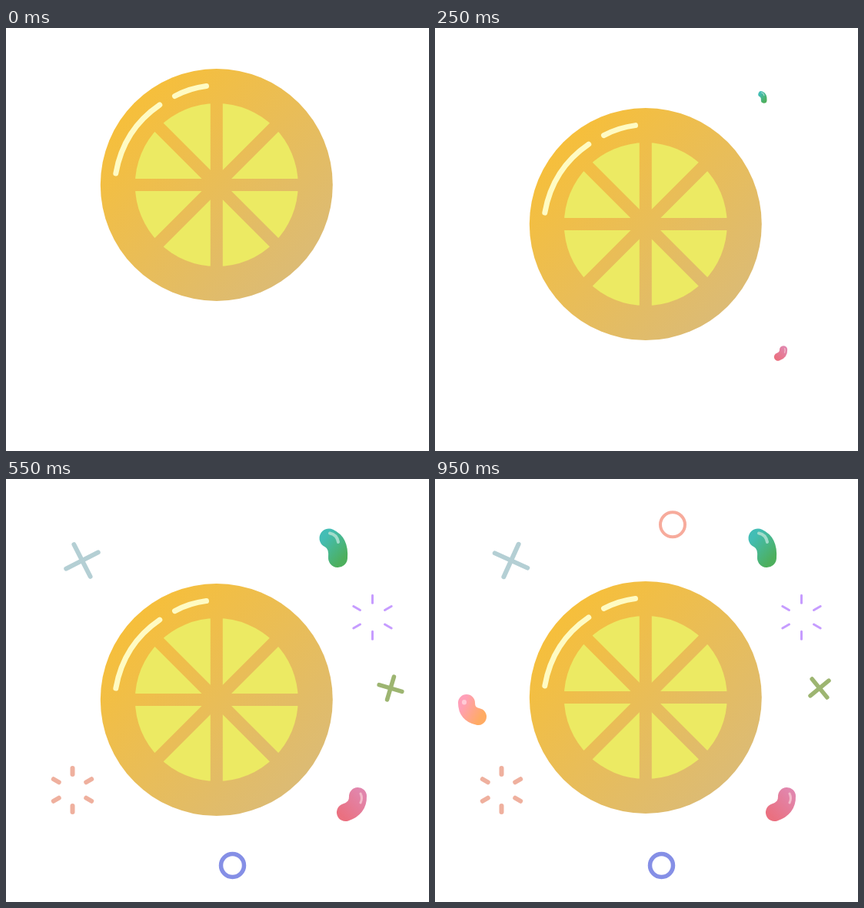
Recreate the animation shown at these times as an HTML page with a canvas. Size 550 by 550 pixels, loop 1000 ms.

```html
<!DOCTYPE html>
<html lang="en">
<head>
<meta charset="utf-8">
<title>Lemon drop</title>
<style>
  html, body { margin: 0; height: 100%; overflow: hidden; background: #fff; }
  canvas { display: block; }
</style>
</head>
<body>
<canvas id="stage" width="550" height="550"></canvas>
<script>
const ctx = document.getElementById('stage').getContext('2d');
const LOOP = 1000, STEP = 50;

// Piecewise linear value at time t from [time, value] pairs.
function track(t, keys) {
  if (t <= keys[0][0]) return keys[0][1];
  for (let i = 1; i < keys.length; i++) {
    const [t0, a] = keys[i - 1], [t1, b] = keys[i];
    if (t <= t1) return a + (b - a) * (t - t0) / (t1 - t0);
  }
  return keys[keys.length - 1][1];
}

// Quick growth that settles, for the crosses and rings.
const pop = (t, start) =>
  track(t, [[start, 0], [start + 50, .6], [start + 100, .87], [start + 150, 1]]);

function at(x, y, scale, angle, draw) {
  if (scale <= 0) return;
  ctx.save();
  ctx.translate(x, y);
  ctx.scale(scale, scale);
  ctx.rotate(angle * Math.PI / 180);
  ctx.lineCap = 'round';
  draw();
  ctx.restore();
}

function stroke(color, width) {
  ctx.strokeStyle = color;
  ctx.lineWidth = width;
  ctx.stroke();
}

function line(x0, y0, x1, y1, color, width) {
  ctx.beginPath();
  ctx.moveTo(x0, y0);
  ctx.lineTo(x1, y1);
  stroke(color, width);
}

function curve([x0, y0, cx, cy, x1, y1], color, width) {
  ctx.beginPath();
  ctx.moveTo(x0, y0);
  ctx.quadraticCurveTo(cx, cy, x1, y1);
  stroke(color, width);
}

function disc(r, color) {
  ctx.beginPath();
  ctx.arc(0, 0, r, 0, Math.PI * 2);
  ctx.fillStyle = color;
  ctx.fill();
}

function gradient(x0, y0, x1, y1, from, to) {
  const g = ctx.createLinearGradient(x0, y0, x1, y1);
  g.addColorStop(0, from);
  g.addColorStop(1, to);
  return g;
}

function lemon(y) {
  at(273.8, y, 1, 0, () => {
    const skin = gradient(-107, -107, 107, 107, '#f6bf3b', '#dcbb74');
    disc(151, skin);
    disc(106, '#ecea63');
    for (let i = 0; i < 4; i++) {
      const a = i * Math.PI / 4, x = 108 * Math.cos(a), y = 108 * Math.sin(a);
      line(-x, -y, x, y, skin, 16);
    }
    curve([-131, -15, -121, -72, -74, -104], '#fffbc3', 7);
    curve([-54.3, -115.5, -35, -125.8, -13.3, -128.5], '#fffbc3', 7);
  });
}

function bean(x, y, scale, body, width, colors, shine, shineColor, shineWidth) {
  at(x, y, scale, 0, () => {
    curve(body, gradient(...colors), width);
    curve(shine, shineColor, shineWidth);
  });
}

function burst(x, y, inner, outer, color, width) {
  for (let i = 0; i < 6; i++)
    at(x, y, 1, 30 + i * 60, () => line(inner, 0, outer, 0, color, width));
}

function cross(x, y, scale, angle, half, color, width) {
  at(x, y, scale, angle, () => {
    line(-half, 0, half, 0, color, width);
    line(0, -half, 0, half, color, width);
  });
}

function ring(x, y, scale, r, color, width) {
  at(x, y, scale, 0, () => {
    ctx.beginPath();
    ctx.arc(0, 0, r, 0, Math.PI * 2);
    stroke(color, width);
  });
}

function render(t) {
  ctx.fillStyle = '#fff';
  ctx.fillRect(0, 0, 550, 550);

  lemon(track(t, [[0, 204], [450, 296], [700, 273.7], [1000, 286]]));

  bean(426, 90, track(t, [[200, 0], [300, .615], [400, .867], [500, 1]]),
    [-6, -13, 7, -7, 5.5, 12.5], 25,
    [-14, -12, 14, 12, '#43bdb5', '#4daf5d'],
    [-5, -19.5, 4, -18, 6, -8], '#a2dccb', 4);
  bean(449.5, 423, track(t, [[200, 0], [300, .89], [350, 1]]),
    [8, -10.5, 8.5, 5, -8, 10.5], 23,
    [-14, 14, 14, -14, '#ea7080', '#e186ad'],
    [11.5, -14, 14.5, -8, 11.5, -2], '#f3bccb', 3);
  bean(48.5, 300, pop(t, 550),
    [-7.5, -9, -7.5, 6, 7.5, 9], 22,
    [-14, -6, 12, 8, '#ff9fb8', '#ffab63'],
    [-10.5, -10, -10.5, -9.7, -10.5, -9.5], '#ffcbd6', 6);

  if (t >= 300) {
    const p = track(t, [[290, 0], [400, 1]]);
    burst(86.5, 404.5, 18.3 + 2.2 * p, 18.5 + 10 * p, '#efb09e', 6);
  }
  if (t >= 450) {
    const p = track(t, [[440, 0], [550, 1]]);
    burst(476.5, 179.8, 16.5 + 2 * p, 17 + 11.5 * p, '#c69cff', 3);
  }

  cross(99, 106, pop(t, 400), 63 - .0965 * (t - 550), 23.3, '#b4cfd4', 6);
  cross(500, 272, pop(t, 400), 16.7 - .14 * (t - 550), 15.5, '#9db571', 5.5);
  ring(294.5, 502.5, pop(t, 400), 15, '#858fe6', 5.5);
  ring(309, 59.3, pop(t, 550), 16, '#f7ab9c', 4);
}

function tick(now) {
  render(Math.floor(now % LOOP / STEP) * STEP);
  requestAnimationFrame(tick);
}
render(0);
requestAnimationFrame(tick);
</script>
</body>
</html>
```
